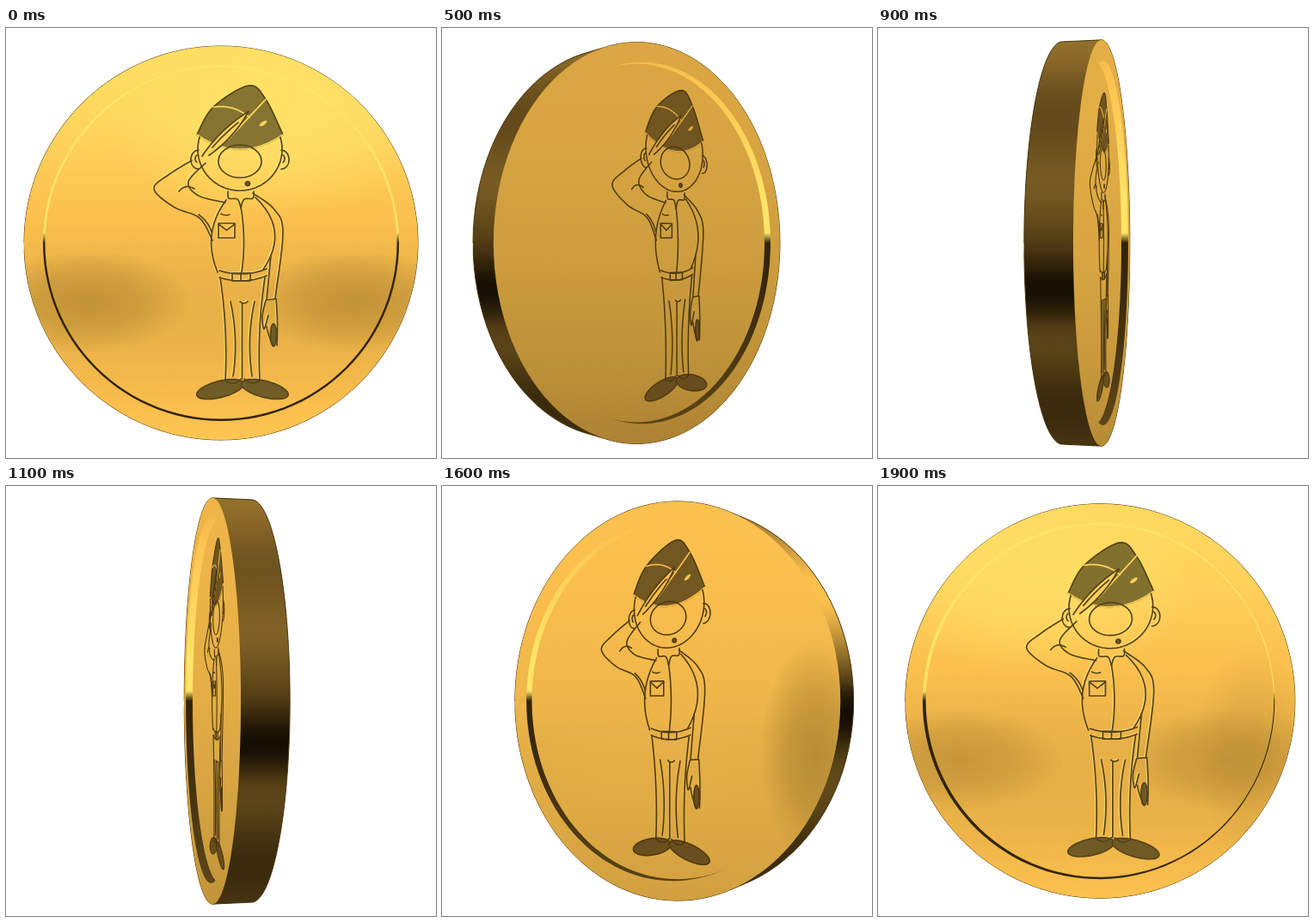
Animation, 500 px wide and 500 px high, one loop 2 s. Source, as an HTML page with a canvas:

```html
<!DOCTYPE html>
<html>
<head>
<meta charset="utf-8">
<title>Turning coin</title>
<style>
html, body { margin: 0; width: 100%; height: 100%; overflow: hidden; background: #fff; }
canvas { display: block; width: 500px; height: 500px; }
</style>
</head>
<body>
<canvas id="stage" width="500" height="500"></canvas>
<script>
const ctx = document.getElementById('stage').getContext('2d');
const LOOP = 2000, STEP = 100;
const MID = 250, EYE = 830, RADIUS = 229, RING = 207;
const FRONT = 9, BACK = -24, DEPTH = 10;
const METAL = ['#150d03', '#38290c', '#70541f', '#bc9038', '#fcc04e', '#ffe468'];

let cos, sin, turn, front, facing, lit;

const lerp = (a, b, k) => a + (b - a) * k;
const clamp = v => Math.max(0, Math.min(1, v));
const bell = v => Math.exp(-v * v);
const rgb = hex => [1, 3, 5].map(i => parseInt(hex.slice(i, i + 2), 16));

function blend(a, b, k) {
  const p = rgb(a), q = rgb(b);
  return 'rgb(' + p.map((v, i) => Math.round(lerp(v, q[i], k))).join() + ')';
}

// Metal colour for a light level from 0 to 1
function metal(level) {
  const at = clamp(level) * (METAL.length - 1);
  const i = Math.min(Math.floor(at), METAL.length - 2);
  return blend(METAL[i], METAL[i + 1], at - i);
}

function shade(level) {
  const g = ctx.createLinearGradient(0, 15, 0, 485);
  for (let i = 0; i <= 40; i++) g.addColorStop(i / 40, metal(level(i / 40)));
  return g;
}

function faceLevel(v) {
  const straight = 0.85 + 0.11 * Math.cos(v * 4.65);
  const tilted = 0.74 - 0.14 * v * v - 0.05 * Math.sin(2 * Math.atan2(sin, cos));
  return lerp(tilted, straight, facing);
}

function rimLevel(v) {
  const glow = lit * lit;
  return 0.44 - 0.2 * v + 0.05 * Math.cos(17.5 * v)
    - 0.3 * bell((v - 0.62 + 0.1 * glow) / 0.07)
    + 0.5 * glow * bell((v - 0.22) / 0.13);
}

function wallLevel(v) {
  return v < 0.5 ? lerp(0.75, 1, clamp(v * 2.5 + facing)) : lerp(0.16, 0.35, (v - 0.5) * 2 * (1 - facing));
}

// Perspective: x and y on the coin, n along its axis
function project(x, y, n) {
  const scale = EYE / (EYE + x * sin + FRONT - n * cos);
  return [MID + (x * cos + n * sin) * scale, MID + y * scale];
}

function trace(pts, close) {
  ctx.beginPath();
  pts.forEach(p => ctx.lineTo(p[0], p[1]));
  if (close) ctx.closePath();
}

function disc(r, n) {
  return oval(0, 0, r, r).map(([x, y]) => project(x, y, n));
}

function hull(pts) {
  pts = pts.slice().sort((a, b) => a[0] - b[0] || a[1] - b[1]);
  const half = list => {
    const out = [];
    for (const p of list) {
      while (out.length > 1) {
        const a = out[out.length - 2], b = out[out.length - 1];
        if ((b[0] - a[0]) * (p[1] - a[1]) > (b[1] - a[1]) * (p[0] - a[0])) break;
        out.pop();
      }
      out.push(p);
    }
    return out.slice(0, -1);
  };
  return half(pts).concat(half(pts.reverse()));
}

// Line builders, in stage coordinates
function oval(x, y, rx, ry, from = 0, to = 2 * Math.PI, tilt = 0) {
  const out = [], c = Math.cos(tilt), s = Math.sin(tilt);
  for (let i = 0; i <= 120; i++) {
    const a = lerp(from, to, i / 120);
    const u = rx * Math.cos(a), v = ry * Math.sin(a);
    out.push([x + u * c - v * s, y + u * s + v * c]);
  }
  return out;
}

function bow(x0, y0, x1, y1, bulge = 0) {
  const out = [], len = Math.hypot(x1 - x0, y1 - y0);
  for (let i = 0; i <= 12; i++) {
    const u = i / 12, b = 4 * u * (1 - u) * bulge / len;
    out.push([lerp(x0, x1, u) - (y1 - y0) * b, lerp(y0, y1, u) + (x1 - x0) * b]);
  }
  return out;
}

function curve(...keys) {
  const out = [], last = keys.length - 1;
  const at = i => keys[Math.max(0, Math.min(last, i))];
  for (let i = 0; i < last; i++) {
    for (let u = 0; u < 1; u += 0.125) {
      const [a, b, c, d] = [at(i - 1), at(i), at(i + 1), at(i + 2)];
      out.push([0, 1].map(o => b[o] + 0.5 * u * (c[o] - a[o] +
        u * (2 * a[o] - 5 * b[o] + 4 * c[o] - d[o] + u * (3 * (b[o] - c[o]) + d[o] - a[o])))));
    }
  }
  return out.concat([keys[last]]);
}

const box = (x, y, w, h) => [[x, y], [x + w, y], [x + w, y + h], [x, y + h], [x, y]];

const brim = bow(322, 124, 222, 124, -17);
const hat = curve([222, 124], [241, 92], [282, 67], [302, 83], [322, 124]).concat(brim);
const folds = [bow(241, 92, 283, 104, -5), bow(302, 83, 258, 130), brim];
const badge = oval(299, 111, 5, 2, 0, 2 * Math.PI, -0.6);
const hand = bow(228, 149, 282, 97, -4).concat(bow(282, 97, 236, 148, -4));
const shoes = [-1, 1].map(s => oval(275 + 26 * s, 420, 28, 9.5, 0, 2 * Math.PI, 0.25 * s));
const spots = [oval(281, 181, 2.6, 2.4), oval(311, 357, 3.5, 13)];
const lines = buildLines();

function buildLines() {
  const head = [
    oval(272, 141, 49, 48, -0.3, Math.PI + 0.3),
    oval(272, 155, 25, 19)
  ];
  const arm = [
    curve([216, 154], [190, 170], [172, 187], [195, 208], [225, 221], [240, 247]),
    curve([232, 157], [212, 179], [224, 195], [255, 203]),
    bow(201, 190, 219, 187, -4),
    bow(224, 217, 239, 237, -2),
    bow(240, 139, 270, 110, -1)
  ];
  const body = [
    bow(256, 200, 246, 284, 12),
    bow(290, 197, 299, 281, -18),
    bow(273, 208, 274, 284, -3),
    curve([287, 192], [312, 211], [322, 238], [313, 314]),
    bow(308, 264, 303, 316),
    box(247, 227, 19, 17),
    bow(250, 216, 260, 217, 1),
    bow(248, 282, 303, 280, 5),
    bow(248, 290, 303, 288, 5),
    box(263, 285, 21, 9),
    bow(273, 285, 273, 294)
  ];
  const lower = [
    bow(274.5, 320, 274.5, 408),
    bow(272, 318, 281, 318, 2),
    bow(303, 316, 314, 315),
    bow(314, 315, 315, 369, -1),
    curve([302, 317], [298, 335], [300, 350], [305, 334]),
    bow(303, 347, 311, 370, 1)
  ];
  const pairs = [-1, 1].flatMap(s => [
    oval(272 + 48 * s, 153, 9 * s, 11, -Math.PI / 2, Math.PI / 2),
    oval(272 + 48 * s, 152, 4 * s, 5, -1, 1),
    curve([273 + 15 * s, 190], [273 + 14 * s, 198], [273 + 4 * s, 199], [273, 209]),
    bow(256.5 + 9.5 * s, 228, 256.5, 235),
    bow(275 + 26 * s, 290, 275 + 20 * s, 410, 3 * s),
    bow(275 + 14 * s, 318, 275 + 11 * s, 405, 4 * s),
    bow(275 + 20 * s, 410, 275 + 2 * s, 408, -4 * s)
  ]);
  return [...head, ...arm, ...body, ...lower, ...pairs];
}

function drawFigure() {
  const dark = blend('#4c390f', '#57451a', facing);
  const cloth = blend('#70541f', '#857432', facing);
  const leather = blend('#684d1d', '#705c26', facing);
  const light = metal(faceLevel(0.2));
  const place = pts => pts.map(([x, y]) => project(x - MID, y - MID, FRONT));
  const stroke = (pts, color) => {
    trace(place(pts));
    ctx.strokeStyle = color;
    ctx.lineWidth = lerp(1, 1.7, cos);
    ctx.stroke();
  };
  const fill = (pts, color) => {
    trace(place(pts), true);
    ctx.fillStyle = color;
    ctx.fill();
  };
  const solid = (pts, color) => {
    fill(pts, color);
    stroke(pts, dark);
  };

  // Raised edges catch the light when the coin faces us
  ctx.save();
  ctx.globalAlpha = facing * 0.7;
  ctx.translate(-1.2, -1);
  lines.forEach(l => stroke(l, '#ffe684'));
  ctx.restore();

  solid(hat, cloth);
  folds.forEach(l => stroke(l, light));
  fill(badge, light);
  solid(hand, light);
  shoes.concat(spots).forEach(p => solid(p, leather));
  lines.forEach(l => stroke(l, dark));
}

function glow(x, y, rx, ry, color, alpha) {
  ctx.save();
  ctx.globalAlpha = alpha;
  ctx.translate(x, y);
  ctx.scale(rx, ry);
  const g = ctx.createRadialGradient(0, 0, 0, 0, 0, 1);
  g.addColorStop(0, color);
  g.addColorStop(0.5, color + 'b0');
  g.addColorStop(1, color + '00');
  ctx.fillStyle = g;
  ctx.fillRect(-1, -1, 2, 2);
  ctx.restore();
}

function drawRim(rear, face) {
  trace(hull(rear.concat(face)), true);
  ctx.fillStyle = shade(rimLevel);
  ctx.fill();
  ctx.strokeStyle = '#49360f';
  ctx.lineWidth = 1;
  ctx.stroke();
}

function drawFace(face) {
  ctx.save();
  trace(face, true);
  ctx.clip();
  ctx.fillStyle = shade(faceLevel);
  ctx.fillRect(0, 0, 500, 500);
  glow(310 - 800 * turn, 110, 190, 110, '#ffe66a', facing * 0.7);
  for (const side of [-1, 1]) glow(MID + 155 * side, 318, 120, 60, '#b08632', facing * 0.7);
  glow(435, 310, 65, 130, '#a07c2c', lit * 0.7);

  // Sunken wall: inside the ring but outside the floor
  ctx.save();
  trace(disc(RING, front), true);
  ctx.clip();
  trace(disc(RING, front - DEPTH), true);
  ctx.rect(0, 0, 500, 500);
  ctx.clip('evenodd');
  ctx.fillStyle = shade(wallLevel);
  ctx.fillRect(0, 0, 500, 500);
  ctx.restore();

  drawFigure();
  ctx.restore();
}

function draw(t) {
  let angle = t / LOOP * Math.PI;
  if (angle > Math.PI / 2) angle -= Math.PI;
  cos = Math.cos(angle);
  sin = Math.sin(angle);
  turn = Math.abs(sin);
  facing = Math.pow(cos, 12);
  lit = Math.max(0, -Math.sin(2 * angle));
  front = FRONT + 12 * (1 - cos);

  ctx.fillStyle = '#fff';
  ctx.fillRect(0, 0, 500, 500);
  ctx.lineJoin = ctx.lineCap = 'round';
  const face = disc(RADIUS, front);
  drawRim(disc(RADIUS, BACK), face);
  if ((EYE + FRONT) * cos > front) drawFace(face);
}

const start = performance.now();
function tick() {
  const t = (performance.now() - start) % LOOP;
  draw(Math.floor(t / STEP) * STEP);
  requestAnimationFrame(tick);
}
tick();
</script>
</body>
</html>
```
